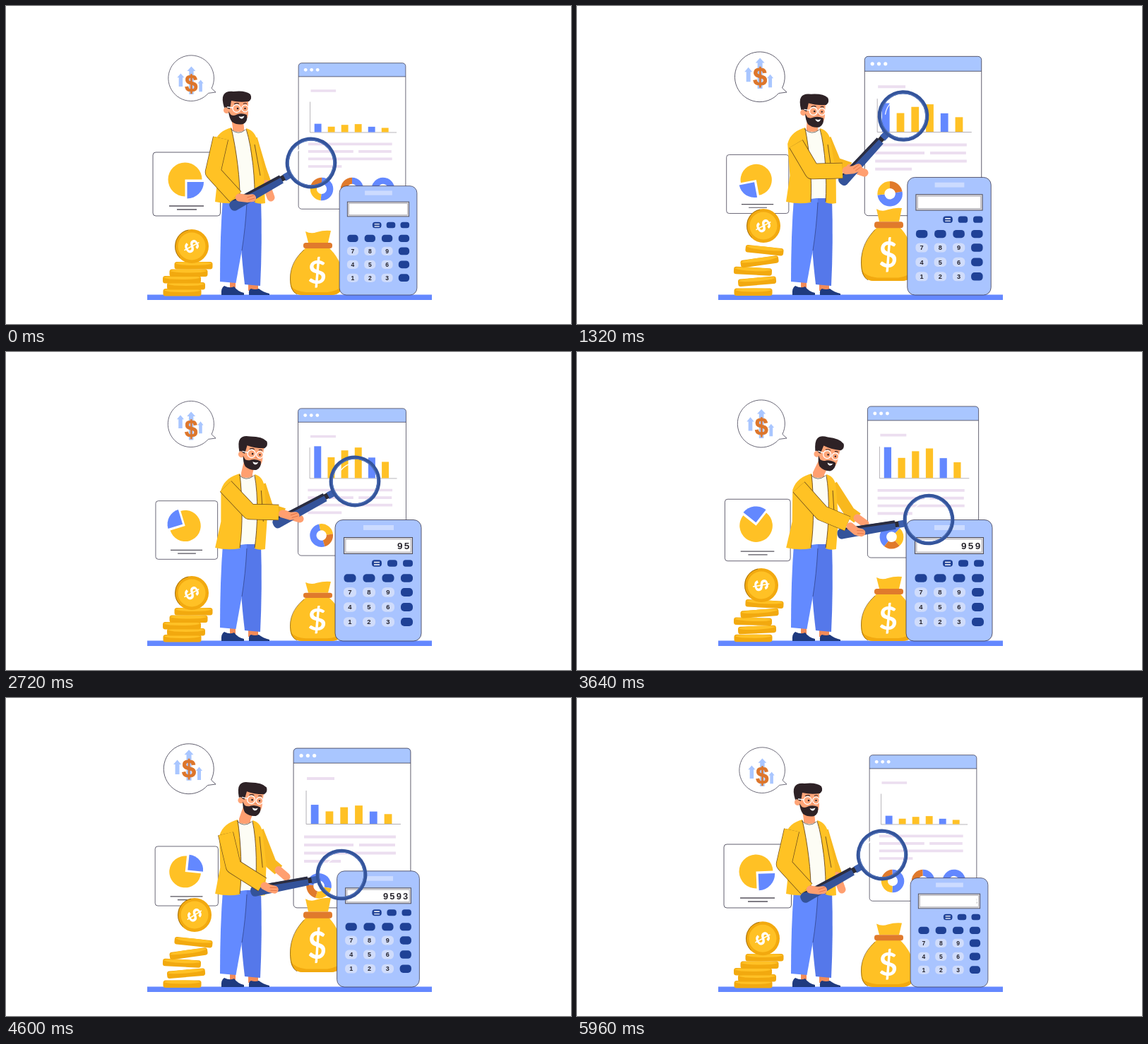
An HTML page that plays this animation: 800x450 px, repeating every 6000 ms.

```html
<!DOCTYPE html>
<html lang="en">
<head>
<meta charset="utf-8">
<title>Financial analysis</title>
<style>
  html, body { margin: 0; width: 100%; height: 100%; overflow: hidden; background: #fff; }
  svg { display: block; width: 800px; height: 450px; }
  text { font-family: "Liberation Sans", Arial, sans-serif; font-weight: bold; text-anchor: middle; }
  .edge { stroke: #39364a; stroke-width: .8; }
  .crease { fill: none; stroke: #6b4a1c; stroke-width: .9; }
  .limb { fill: none; stroke-linejoin: round; }
  .skin { fill: none; stroke: #ff9f70; stroke-linecap: round; stroke-linejoin: round; }
</style>
</head>
<body>
<svg viewBox="0 0 800 450">
  <defs>
    <clipPath id="wipe"><rect id="wipeRect" y="262" width="60" height="24"/></clipPath>
  </defs>

  <rect x="200" y="408.500" width="403" height="7.500" fill="#6488ff"/>

  <g id="bubble">
    <path class="edge" fill="#fff" d="M290.500 116 L297 122 L285.500 123.500 A35.500 35.500 0 1 1 290.500 116Z"/>
    <g id="sideArrows" fill="#a9c6ff">
      <path d="M242.500 88.800 l5.500 6.500 h-2.500 v14 h-6 v-14 h-2.500z"/>
      <path d="M273.500 98.800 l4.500 5.500 h-2 v13 h-5 v-13 h-2z"/>
    </g>
    <g id="bubbleDollar">
      <path fill="#a9c6ff" d="M259 77.500 l6.500 7 h-3 v36.500 h-7 v-36.500 h-3z"/>
      <text x="259" y="116" font-size="36" fill="#dd762b" stroke="#dd762b" stroke-width=".8">$</text>
    </g>
  </g>

  <g id="card">
    <rect class="edge" x="208" y="207" width="95.500" height="90" rx="4" fill="#fff"/>
    <g id="pie">
      <path fill="#ffc125" d="M0 0 V24 A24 24 0 1 1 24 0Z"/>
      <path fill="#6388ff" d="M3 3.500 H26.500 A23.500 23.500 0 0 1 3 27Z"/>
    </g>
    <path stroke="#55525c" stroke-width="1.300" d="M231 283 H280 M242 288 H270"/>
  </g>

  <g id="window">
    <rect x="407" y="71" width="166" height="226" rx="5" fill="#fff"/>
    <path fill="#a9c6ff" d="M407 92 V76 Q407 71 412 71 H568 Q573 71 573 76 V92Z"/>
    <path class="edge" d="M407 92 H573"/>
    <rect class="edge" x="407" y="71" width="166" height="226" rx="5" fill="none"/>
    <g fill="#fff"><circle cx="418" cy="81.500" r="2.600"/><circle cx="427.300" cy="81.500" r="2.600"/><circle cx="436.600" cy="81.500" r="2.600"/></g>
    <path stroke="#ecdef0" stroke-width="4" d="M426 114 H465 M422 196.500 H552 M422 208 H492 M500 208 H551 M422 219.500 H552 M422 231 H474"/>
    <path fill="none" stroke="#aaa6ad" stroke-width=".9" d="M425 131 V178.500 H559"/>
    <g id="bars"></g>
    <g id="donuts" fill="none" stroke-width="10"></g>
  </g>

  <g id="stack"></g>
  <g id="coin">
    <circle r="24" fill="#f2a90f"/>
    <circle r="23.500" fill="none" stroke="#6b4a1c" stroke-width=".6" stroke-dasharray="50 100" stroke-dashoffset="-55"/>
    <circle r="19.500" fill="#ffc125"/>
    <g id="coinSign"><text y="10" font-size="29" fill="#fff">$</text></g>
  </g>

  <g id="bag">
    <path fill="#ffc125" d="M428 -74 L424 -90 Q432 -86 440 -89 Q450 -92 460 -91 L456 -74Z"/>
    <path fill="#ffc125" d="M425 -67 C415 -59 402 -42 402 -22 Q402 0 420 0 H460 Q478 0 478 -22 C478 -42 466 -59 457 -67Z"/>
    <path fill="#f2a90f" d="M403 -13 Q407 0 420 0 H460 Q474 0 477 -13 Q468 -5 455 -4 H425 Q410 -5 403 -13Z"/>
    <path fill="none" stroke="#7a5410" stroke-width=".7" d="M422 -64 C412 -55 402 -42 402.500 -22 Q403 -5 412 -1"/>
    <rect x="421" y="-74" width="41" height="8" rx="3.500" fill="#e07a2c"/>
    <text x="440.500" y="-16.500" font-size="46" style="font-family:Lato,sans-serif" fill="#fff">$</text>
  </g>

  <g id="calculator">
    <rect class="edge" x="466" y="237.500" width="122" height="171.500" rx="11" fill="#a9c4ff"/>
    <rect x="506" y="245" width="43" height="7" fill="#ccdbff"/>
    <rect x="478.500" y="262.500" width="97" height="23" fill="#d4d3d8" stroke="#4d4b58"/>
    <rect x="481" y="265" width="92" height="18" fill="#fff" stroke="#a9a7ae" stroke-width=".7"/>
    <g clip-path="url(#wipe)"><text id="display" x="573.500" y="279" font-size="13.500" letter-spacing="2.300" style="text-anchor:end" fill="#2b2830"></text></g>
    <g id="keys"></g>
  </g>

  <g id="person">
    <path id="farSleeve" class="limb" stroke="#f8b81e" stroke-width="16"/>
    <path id="farHand" class="skin" stroke-width="11"/>

    <path fill="#f28b58" d="M317 388 h8 v11 h-8z M343 393 h14 v10 h-14z"/>
    <path fill="#1f3a7e" d="M305 409 Q304 399 309 396 Q317 400 323 397 Q328 404 337 406 V409Z M344 409 Q343 401 347 400 Q353 402 358 400 Q364 405 373 407 V409Z"/>
    <path fill="#5578ea" d="M333 272 H361 Q363 335 360 396 L338 394 Q334 360 333 340Z"/>
    <path fill="#638aff" d="M307 272 H341 Q339 315 334 345 L325.500 392 L303 390 Q303 325 307 272Z"/>
    <path fill="none" stroke="#35488f" stroke-width=".8" d="M341 278 Q339 315 334 346"/>

    <path id="neck" fill="none" stroke="#ff9f70" stroke-width="16"/>
    <g id="torso">
      <path fill="#fdfdf5" d="M316 173 Q329 183 343 173 L354 270 L331 273Z"/>
      <path fill="#ffc224" d="M319 172 C307 176 298 181 295 195 L300 240 L296 277 Q314 281 331 278 C332 246 326 203 319 172Z"/>
      <path fill="#ffc224" d="M340 173 C350 176 354 182 356 192 L365 236 L367 279 Q359 281 352 278 C353 248 349 203 340 173Z"/>
      <path class="crease" d="M319 173 C326 203 332 246 331 277 M340 174 C349 203 353 248 352 277 M352 196 L360 240"/>
      <path fill="none" stroke="#55504a" stroke-width=".8" d="M318 174 Q329 184 339 175"/>
    </g>

    <g id="head">
      <path fill="#ffa578" d="M314 132 H343 V151 Q343 164 330 165 Q318 162 315 148Z"/>
      <circle cx="312.500" cy="147.500" r="4.500" fill="#ffa578"/>
      <path fill="#2e2226" d="M309 144 Q305 131 308 126 Q311 120 322 121 Q339 119 346 125 Q349 131 344 135 Q331 137 319 134 L317 146 L314 145 Q312 142 309 144Z"/>
      <path fill="#2e2226" d="M315 149 L318.500 154 Q323 156 327 153.500 Q334 151 341 154 Q343 163 336 167 Q327 169 320 164 Q316 159 315 149Z"/>
      <path fill="#fff" d="M329.500 156 Q333.500 157.500 337.500 155.500 Q336 160 333 159.500 Q330.500 159 329.500 156Z"/>
      <path fill="none" stroke="#e87e50" d="M333.500 144 L335 150 H332"/>
      <path fill="none" stroke="#2e2226" stroke-width="1.100" d="M323 139 Q327 136.500 330 138.500 M336 138.500 Q339 137 341 138.500"/>
      <g fill="#2e2226"><circle cx="328" cy="145" r="1.300"/><circle cx="338.500" cy="145" r="1.200"/></g>
      <g fill="none" stroke="#fff" stroke-width="1.300"><circle cx="326.500" cy="145" r="5.500"/><circle cx="338.500" cy="145" r="4.800"/><path d="M321 144 L313 143"/></g>
    </g>

    <g id="glass">
      <rect x="35" y="-5" width="9" height="10" rx="1.500" fill="#3c5fae"/>
      <rect x="43" y="-3.500" width="6" height="8" fill="#2b2a35"/>
      <path fill="#34539a" d="M48 -6 L125 -7.500 Q131 -7 131 0 Q131 7 125 7.500 L48 6Z"/>
      <path fill="#2b2d40" d="M48 2.500 L110 4 Q120 5 124 7.500 L48 6.500Z"/>
      <circle r="33.700" fill="none" stroke="#34549b" stroke-width="5.200"/>
      <circle r="31.800" fill="none" stroke="#5577bd" stroke-width="1"/>
      <path fill="none" stroke="#fff" stroke-width="1.200" d="M16 20 Q6 27 -6 25"/>
    </g>

    <path id="nearOutline" class="limb" stroke="#6b4a1c" stroke-width="22.400"/>
    <path id="nearSleeve" class="limb" stroke="#ffc224" stroke-width="21"/>
    <path id="nearHand" class="skin" stroke-width="11"/>
    <path id="fingers" fill="none" stroke="#d9683d" stroke-width=".8"/>
  </g>
</svg>

<script>
const LOOP = 6000, STEP = 40;
const POSE_TIMES = [0, 1320, 2120, 2720, 3640, 4600, 5900];
const HOP_TIMES = [0, 640, 1320, 1600, 2120, 2720];
const BLUE = '#6388ff', GOLD = '#ffc125', RUST = '#e07a2c';
const el = id => document.getElementById(id);
const set = (id, name, value) => el(id).setAttribute(name, value);
const move = (id, value) => set(id, 'transform', value);
const mix = (a, b, k) => a + (b - a) * k;
const mid = (p, q, k) => [mix(p[0], q[0], k), mix(p[1], q[1], k)];
const line = (...points) => 'M' + points.map(p => p.map(v => v.toFixed(2)).join(' ')).join('L');

// Cyclic monotone cubic through (times[i], values[i]).
function curve(times, values, period) {
  const n = times.length;
  const at = i => times[(i + n) % n] + Math.floor(i / n) * period;
  const val = i => values[(i + n) % n];
  const slope = i => (val(i + 1) - val(i)) / (at(i + 1) - at(i));
  const tangent = i => {
    const a = slope(i - 1), b = slope(i);
    return a * b <= 0 ? 0 : 2 * a * b / (a + b);
  };
  return time => {
    const t = time % period;
    let i = n - 1;
    while (times[i] > t) i--;
    const span = at(i + 1) - at(i), u = (t - at(i)) / span, v = 1 - u;
    return val(i) * (1 + 2 * u) * v * v + val(i + 1) * u * u * (3 - 2 * u)
      + span * u * v * (tangent(i) * v - tangent(i + 1) * u);
  };
}
const pose = (...values) => curve(POSE_TIMES, [...values, values[0]], LOOP);
const hop = (...values) => curve(HOP_TIMES, values, LOOP / 2);
const posePoint = (xs, ys) => {
  const x = pose(...xs), y = pose(...ys);
  return t => [x(t), y(t)];
};

const lens = posePoint([432, 462, 481, 494, 498, 475], [222, 155.5, 151.5, 183, 237, 250]);
const tilt = pose(29, 47.2, 40.3, 28.3, 9.3, 10.8);
const lean = pose(0, 4, 9, 12, 13, 9);
const headAt = posePoint([0, 8, 14.5, 20.5, 26.5, 20], [0, 4, -1, -1, 0, -1]);
const headTurn = pose(0, 3, 3, 7, 13, 7);
const shoulder = posePoint([304, 310, 309, 311, 314, 311], [187, 195, 189, 190, 191, 192]);
const elbow = posePoint([293, 333, 340, 345, 347, 322], [235, 234, 225, 226, 228, 238]);
const cuff = posePoint([325, 376, 385, 386, 383, 363], [270, 233, 221, 227, 243, 264]);
const farElbow = posePoint([361, 366, 372, 371, 386, 375], [232, 222, 224, 222, 227, 234]);
const farPalm = posePoint([375, 407, 412, 416, 408, 397], [271, 236, 227, 236, 243, 253]);
const barGrowth = pose(.265, .83, 1, 1, .94, .55);
const calcSize = pose(.9, .971, 1, 1, 1, .957);
const bagLift = hop(0, 0, 20, 21, 7, 0);
const bagHeight = hop(91, 91, 103, 105, 99, 84);
const stackRise = hop(0, .5, 1, 1, .67, 0);
const coinX = hop(263, 261, 264, 267, 267, 263);
const coinY = hop(340, 330, 311, 307, 313, 341);
const coinTurn = hop(62, 80, 62, 58, 55, 62);

const bars = [49, 32, 42.6, 47, 31.6, 25].map((height, i) => ({ x: 431.7 + 20.8 * i, height }));
el('bars').innerHTML = bars.map((bar, i) =>
  `<rect x="${bar.x}" width="10.800" fill="${i % 4 ? GOLD : BLUE}"/>`).join('');

function arc(from, to, color) {
  const point = deg => [Math.cos(deg * Math.PI / 180) * 12.8, Math.sin(deg * Math.PI / 180) * 12.8];
  return `<path stroke="${color}" d="M${point(from)}A12.8 12.8 0 ${+(to - from > 180)} 1 ${point(to)}"/>`;
}
const donuts = [[443, -90, 95, 190], [490, -90, 90, 180], [538, -190, 30, 100]];
el('donuts').innerHTML = donuts.map(([, a, b, c]) =>
  `<g>${arc(a, b, BLUE)}${arc(b, c, GOLD)}${arc(c, a + 360, RUST)}</g>`).join('');

// Each coin: x, resting y, raised y, raised tilt.
const coins = [[249.5, 405, 404.5, 0], [255, 396, 389.5, -5], [249, 387, 375, 3], [258.5, 377.5, 361.5, -8], [265.5, 367, 345.5, 6]];
el('stack').innerHTML = coins.map(() =>
  `<g><rect x="-27" y="-5" width="54" height="10.500" rx="3.500" fill="#f2a90f"/><path fill="${GOLD}" d="M-26 -2.500 Q-24 -5 0 -5 Q24 -5 26 -2.500 Q20 0 0 0 Q-20 0 -26 -2.500Z"/></g>`).join('');

const button = (x, y, w, h, color) =>
  `<rect x="${x - w / 2}" y="${y - h / 2}" width="${w}" height="${h}" rx="${h * .42}" fill="${color}"/>`;
const columns = [487, 514, 541, 567.5], NAVY = '#1f4196';
let keys = [525, 547, 569].map(x => button(x, 299, 14, 9.5, NAVY)).join('')
  + '<path stroke="#fff" stroke-width="1.500" d="M521 297.500h8M521 301h8"/>'
  + columns.map(x => button(x, 320, 17, 11.5, NAVY)).join('');
['789', '456', '123'].forEach((digits, row) => {
  const y = 340 + 21 * row;
  keys += button(columns[3], y, 17, 12, NAVY);
  [...digits].forEach((digit, i) => {
    keys += button(columns[i], y, 18, 13.5, '#d0dcfb')
      + `<text x="${columns[i]}" y="${y + 3.4}" font-size="9.500" fill="#26252f">${digit}</text>`;
  });
});
el('keys').innerHTML = keys;

const scaleAt = (x, y, s) => `translate(${x} ${y}) scale(${s}) translate(${-x} ${-y})`;

function drawScene(t) {
  const slow = Math.cos(2 * Math.PI * t / 3000), quick = Math.cos(2 * Math.PI * t / 2000);
  const growth = (1 - slow) / 2, rise = stackRise(t), spin = 360 * t / LOOP;

  move('bubble', scaleAt(297, 122, mix(.91, 1, growth)));
  move('sideArrows', `translate(0 ${4 * quick})`);
  move('bubbleDollar', `translate(0 ${4.4 * slow})`);

  move('card', scaleAt(256, 252, .95 + .05 * quick));
  move('pie', `translate(253.5 245.5) rotate(${spin})`);

  move('window', scaleAt(490, 184, mix(.914, 1, growth)));
  [...el('bars').children].forEach((rect, i) => {
    const height = bars[i].height * barGrowth(t);
    rect.setAttribute('y', 178 - height);
    rect.setAttribute('height', height);
  });
  [...el('donuts').children].forEach((g, i) =>
    g.setAttribute('transform', `translate(${donuts[i][0]} 266) rotate(${spin})`));

  [...el('stack').children].forEach((g, i) => {
    const [x, low, high, angle] = coins[i];
    g.setAttribute('transform', `translate(${x} ${mix(low, high, rise)}) rotate(${angle * rise})`);
  });
  move('coin', `translate(${coinX(t)} ${coinY(t)})`);
  move('coinSign', `rotate(${coinTurn(t)})`);
  move('bag', `translate(0 ${409 - bagLift(t)}) scale(1 ${bagHeight(t) / 91})`);

  move('calculator', scaleAt(527, 409, calcSize(t)));
  el('display').textContent = '9593'.slice(0, [2000, 2560, 3200, 4000].filter(start => t >= start).length);
  set('wipeRect', 'x', mix(533, 571.5, Math.max(0, (t - 4800) / 1200)));

  drawPerson(t);
}

function drawPerson(t) {
  const shift = lean(t), skew = shift / 105, [hx, hy] = headAt(t);
  move('torso', `matrix(1 0 ${-skew} 1 ${skew * 278} 0)`);
  move('head', `translate(${hx} ${hy}) rotate(${headTurn(t)} 327 150)`);
  set('neck', 'd', line([329 + shift, 180], [329 + shift, 172], [mix(329 + shift, 326 + hx, .7), 157 + hy]));

  const [lx, ly] = lens(t), angle = tilt(t), rad = angle * Math.PI / 180;
  move('glass', `translate(${lx} ${ly}) rotate(${180 - angle})`);
  const along = (d, side = 0) => [
    lx - d * Math.cos(rad) - side * Math.sin(rad),
    ly + d * Math.sin(rad) - side * Math.cos(rad)];

  const palm = farPalm(t), bend = farElbow(t), farCuff = mid(bend, palm, .5);
  set('farSleeve', 'd', line([348 + shift, 188], bend, farCuff));
  set('farHand', 'd', line(farCuff, palm));

  const wrist = cuff(t), sleeve = line(shoulder(t), elbow(t), wrist);
  set('nearOutline', 'd', sleeve);
  set('nearSleeve', 'd', sleeve);
  set('nearHand', 'd', line(mid(wrist, along(105), .35), along(104), along(97, -3)));
  set('fingers', 'd', line(along(103, 1), along(93, -1)) + line(along(103, -3), along(94, -5)));
}

const start = performance.now();
function tick() {
  const elapsed = (performance.now() - start) % LOOP;
  drawScene(Math.floor(elapsed / STEP) * STEP);
  requestAnimationFrame(tick);
}
tick();
</script>
</body>
</html>
```
